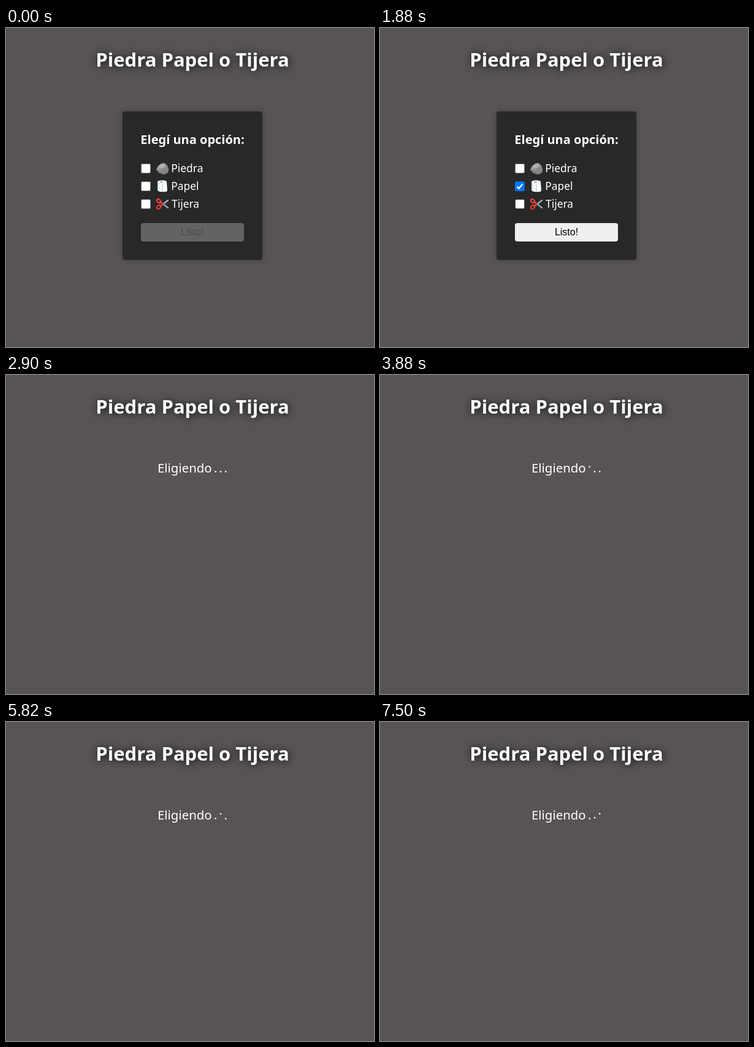
These frames come from a looping animation (600 px wide and 520 px high, 8000 ms). An HTML page:

```html
<!DOCTYPE html>
<html lang="es">
<head>
<meta charset="utf-8">
<title>Piedra Papel o Tijera</title>
<style>
  html, body { margin: 0; width: 100%; height: 100%; overflow: hidden; background: #585455; }
  svg { display: block; width: 600px; height: 520px; }
  text { font-family: "Noto Sans", "Open Sans", sans-serif; fill: #fff; }
  .title { font-size: 31px; font-weight: 700; filter: drop-shadow(1px 1px 7px #0a0a0a); }
  .question { font-size: 20px; font-weight: 700; }
  .label { font-size: 17.4px; }
  .status { font-size: 20.4px; }
  .button { font: 16px "Liberation Sans", Arial, sans-serif; }
  .panel { filter: drop-shadow(0 0 5px rgba(0, 0, 0, .3)); }
</style>
</head>
<body>
<svg viewBox="0 0 600 520">
  <defs>
    <linearGradient id="stone" x1="0" y1="0" x2="1" y2="1">
      <stop offset="0" stop-color="#b4b3b0"/>
      <stop offset="1" stop-color="#707173"/>
    </linearGradient>
    <linearGradient id="paper">
      <stop offset="0" stop-color="#c9dbe3"/>
      <stop offset=".5" stop-color="#fff"/>
      <stop offset="1" stop-color="#b9d0da"/>
    </linearGradient>
  </defs>
  <text class="title" x="304" y="63" text-anchor="middle">Piedra Papel o Tijera</text>

  <g id="form">
    <rect class="panel" x="190" y="136" width="228" height="242" rx="4" fill="#282828"/>
    <text class="question" x="304" y="189" text-anchor="middle">Elegí una opción:</text>
    <g id="boxes"></g>
    <text class="label" x="269.3" y="235">Piedra</text>
    <text class="label" x="269.3" y="264">Papel</text>
    <text class="label" x="270" y="293">Tijera</text>

    <g transform="translate(244 218)">
      <path d="M1 13 4 7 9 3 14 2 19 6 21.5 13 20 18 14 21 6 18.5Z" fill="url(#stone)"/>
      <path d="M4 8 9 4 14 3 16 8 10 11Z" fill="#c0bfbc" opacity=".6"/>
      <path d="M10 11 16 8 20 13 14 20Z" fill="#858687" opacity=".7"/>
      <path d="M2 13 8 14 13 20 6 18Z" fill="#7d7e7f"/>
    </g>
    <g transform="translate(244 247)">
      <path d="M3 4V18Q7 21 13 20V4Z" fill="url(#paper)"/>
      <path d="M12 4 18 3 19 19Q16 20.5 12 20Z" fill="#fafdfe"/>
      <ellipse cx="10.5" cy="4" rx="7.5" ry="2.7" fill="#f4fafc"/>
      <ellipse cx="9.5" cy="4" rx="2.8" ry="1.1" fill="#8da4ae"/>
    </g>
    <g transform="translate(244 276)" fill="none" stroke-linecap="round">
      <path d="M9 8.5 20 17M9 13.5 20 5" stroke="#90a4ae" stroke-width="2.4"/>
      <path d="M10 12.5 20 4.7" stroke="#c7d4da"/>
      <path d="M7.5 7.3 12 11M7.5 14.7 12 11" stroke="#e53935" stroke-width="2.4"/>
      <ellipse cx="5" cy="6" rx="3.5" ry="2.5" transform="rotate(38 5 6)" stroke="#f0443b" stroke-width="2"/>
      <ellipse cx="5" cy="16" rx="3.5" ry="2.5" transform="rotate(-38 5 16)" stroke="#e53935" stroke-width="2"/>
      <circle cx="12.3" cy="11" r="1" fill="#546e7a"/>
    </g>

    <rect id="button" x="220" y="318" width="168" height="30" rx="4"/>
    <text id="buttonText" class="button" x="304" y="338" text-anchor="middle">Listo!</text>
  </g>

  <g id="waiting">
    <text class="status" x="247" y="159">Eligiendo</text>
    <g id="dots" fill="#fff"></g>
  </g>
</svg>
<script>
const LOOP = 8000, HOLD = 7500, WAIT = 2900, LIFT = 8;
const $ = id => document.getElementById(id);

function add(parent, tag, attrs) {
  const el = document.createElementNS("http://www.w3.org/2000/svg", tag);
  for (const key in attrs) el.setAttribute(key, attrs[key]);
  return parent.appendChild(el);
}

const boxes = [221, 250, 279].map(y => {
  const g = add($("boxes"), "g", { transform: `translate(220 ${y})` });
  return {
    square: add(g, "rect", { x: .5, y: .5, width: 15, height: 15, rx: 2 }),
    tick: add(g, "path", { d: "M3.4 8.6 6.4 11.6 12.4 4.4", fill: "none", stroke: "#fff", "stroke-width": 2.2 })
  };
});
const dots = [341.7, 350, 358.2].map(x =>
  add($("dots"), "rect", { x: x - 1.3, y: 156.2, width: 2.6, height: 2.6, rx: 1.1 }));

// [start, hovered item]: 0-2 checkboxes, 3 button, -1 none
const hovers = [[0, -1], [500, 0], [780, 1], [1360, -1], [1640, 1], [1880, 2], [2040, -1], [2160, 3]];
// [rise start, rise end, fall start, fall end]
const waves = [[2900, 3950, 3950, 6300], [3950, 6300, 6300, 8650], [6300, 7700, 8650, 11000]];

// CSS "ease", cubic-bezier(.25, .1, .25, 1)
function ease(from, to, t) {
  const x = Math.min(1, Math.max(0, (t - from) / (to - from)));
  let lo = 0, hi = 1;
  for (let i = 0; i < 20; i++) {
    const s = (lo + hi) / 2;
    if (.75 * s * (1 - s) + s ** 3 < x) lo = s; else hi = s;
  }
  const s = (lo + hi) / 2;
  return .3 * s * (1 - s) ** 2 + 3 * s * s * (1 - s) + s ** 3;
}

function drawForm(t) {
  const hover = hovers.filter(h => h[0] <= t).pop()[1];
  const chosen = t >= 1640;
  boxes.forEach(({ square, tick }, i) => {
    const on = chosen && i === 1, over = hover === i;
    const blue = over ? "#005cc8" : "#0075ff";
    square.setAttribute("fill", on ? blue : "#fff");
    square.setAttribute("stroke", on ? blue : over ? "#4f4f4f" : "#767676");
    tick.style.display = on ? "" : "none";
  });
  $("button").setAttribute("fill", !chosen ? "#636363" : hover === 3 ? "#d0d0d0" : "#efefef");
  $("buttonText").style.fill = chosen ? "#000" : "#4a4a4a";
}

function draw(now) {
  const t = Math.min(now % LOOP, HOLD), waiting = t >= WAIT;
  $("form").style.display = waiting ? "none" : "";
  $("waiting").style.display = waiting ? "" : "none";
  if (waiting) dots.forEach((dot, i) => {
    const [a, b, c, d] = waves[i];
    const y = -LIFT * (ease(a, b, t) - ease(c, d, t));
    dot.setAttribute("transform", `translate(0 ${y.toFixed(2)})`);
  });
  else drawForm(t);
}

const start = performance.now();
function tick() {
  draw(performance.now() - start);
  requestAnimationFrame(tick);
}
tick();
</script>
</body>
</html>
```
